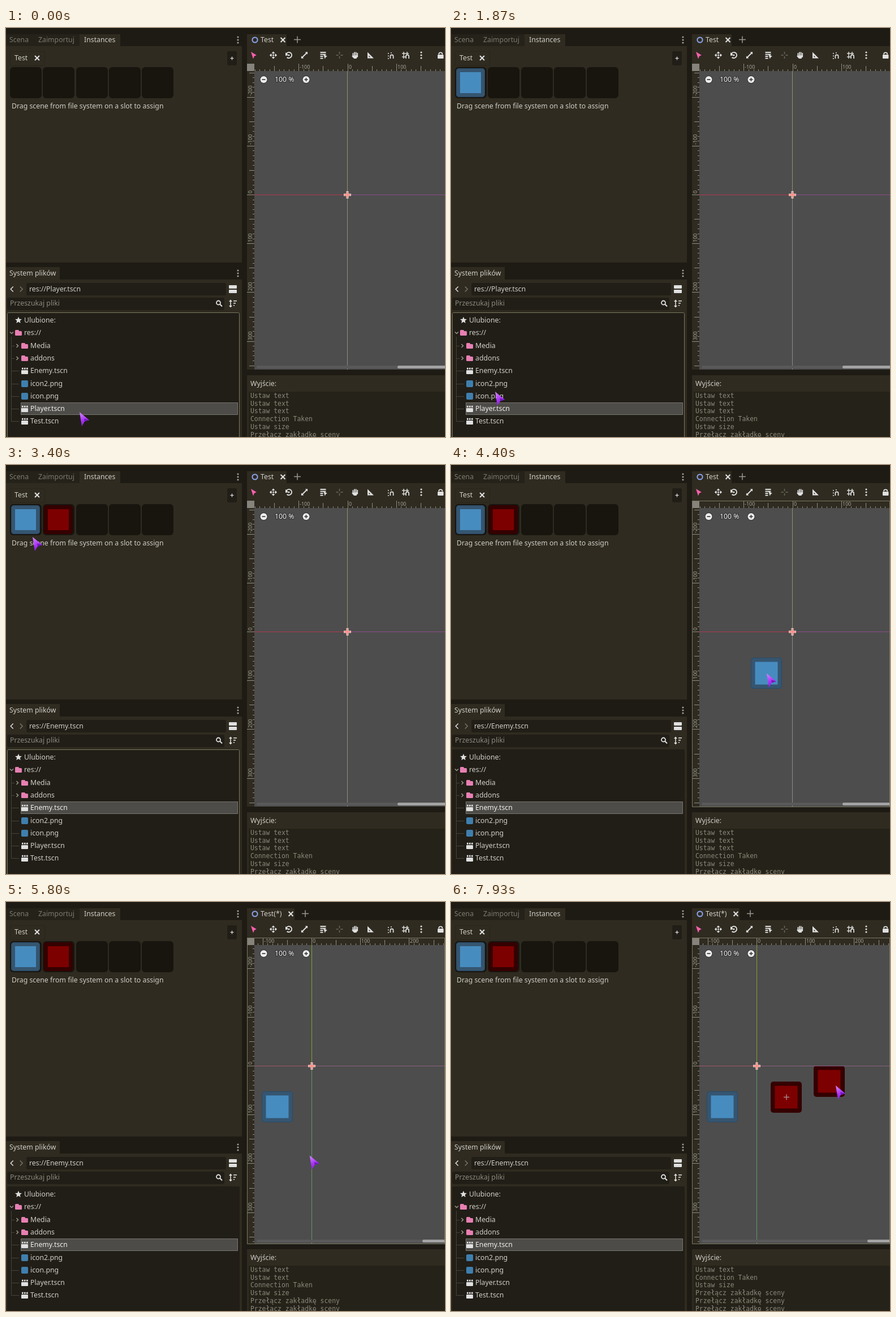
These frames come from a looping animation (776x722 px, 8 s). An HTML page with a canvas:

```html
<!DOCTYPE html>
<html lang="pl">
<head>
<meta charset="utf-8">
<title>Instances</title>
<style>
html, body { margin: 0; width: 100%; height: 100%; overflow: hidden; background: #1e1b15; }
canvas { display: block; }
</style>
</head>
<body>
<canvas id="stage" width="776" height="722"></canvas>
<script>
const g = document.getElementById('stage').getContext('2d');
const W = 776, H = 722, LOOP = 8000, STEP = 200 / 3;
const SANS = '12.3px "Noto Sans", sans-serif';
const MONO = '11.41px "DejaVu Sans Mono", monospace';
const RULER = '9px "Noto Sans", sans-serif';
const C = {
  back: '#1e1b15', panel: '#2f2b20', field: '#211e17', slot: '#18150f',
  text: '#d0cec8', dim: '#7d7a70', icon: '#e0e0e0', focus: '#7b7963',
  pink: '#e77fb3', view: '#4d4d4d', tick: '#8f8d84'
};
const VIEW = { x: 439, y: 76, h: 527 };
const UNIT = 0.862;          // pixels per scene unit
const LAG = 0.35;            // carried sprite trails the pointer, in steps
const ROWS = ['Ulubione:', 'res://', 'Media', 'addons', 'Enemy.tscn', 'icon2.png', 'icon.png', 'Player.tscn', 'Test.tscn'];

// Steps at which the state changes
const AT = { dropPlayer: 17, pickEnemy: 35, dropEnemy: 46, takeBlue: 59, focus: 62, placeBlue: 71,
  pan: 74, takeRed: 97, placeRed: 104, takeNext: 114 };

// Pointer moves: first step, last step, end point
const legs = [];
const home = { x: 130, y: 678 };
const go = (from, to, x, y) => legs.push({ from, to, x, y });
const slot = i => [38 + i * 57, 100];
go(1, 5, 109, 673);
go(7, 16, ...slot(0));
go(AT.dropPlayer, 24, 79, 662);
go(24, 28, 78, 642);
go(30, AT.pickEnemy, 72, 603);
go(36, 44, 84, 119);
go(AT.dropEnemy, 51, 47, 127);
go(51, 55, ...slot(0));
go(AT.takeBlue, 65.6, 558, 368);
go(66, 69.6, 543, 367);
go(70, AT.pan, 657, 388);
go(AT.pan, 77, 624, 389);
go(77, 82, 593.5, 383);
go(85, 89, 480, 512);
go(89, 95, 41, 130);
go(95, AT.takeRed, ...slot(1));
go(AT.takeRed, 99, 528, 314);
go(99, 99.6, 593, 344);
go(103, 106, 643, 320);
go(106, 113, ...slot(1));
go(AT.takeNext, 116, 420, 420);
go(116, 117, 545, 243);
go(117, 119, 680, 324);

const ease = u => u * u * (3 - 2 * u);

function pointer(k) {
  let { x, y } = home;
  for (const leg of legs) {
    if (k <= leg.from) break;
    const u = ease(Math.min(1, (k - leg.from) / (leg.to - leg.from)));
    x += (leg.x - x) * u;
    y += (leg.y - y) * u;
  }
  return { x, y };
}

function origin(k) {
  const o = { x: 603.5, y: 294 };
  if (k < AT.pan) return o;
  const a = pointer(AT.pan), b = pointer(Math.min(k, 84));
  return { x: o.x + b.x - a.x, y: o.y + b.y - a.y };
}

function rect(x, y, w, h, color, r = 0) {
  g.fillStyle = color;
  g.beginPath();
  g.roundRect(x, y, w, h, r);
  g.fill();
}

function frame(x, y, w, h, color, r = 0) {
  g.strokeStyle = color;
  g.lineWidth = 1;
  g.beginPath();
  g.roundRect(x + .5, y + .5, w - 1, h - 1, r);
  g.stroke();
}

function text(s, x, mid, color = C.text, font = SANS) {
  g.font = font;
  g.fillStyle = color;
  g.fillText(s, x, Math.round(mid + 4.4));
}

// Polylines given as flat coordinate lists
function trace(points) {
  g.beginPath();
  for (let i = 0; i < points.length; i += 2) g.lineTo(points[i], points[i + 1]);
}

function line(color, width, ...points) {
  trace(points);
  g.strokeStyle = color;
  g.lineWidth = width;
  g.stroke();
}

function poly(color, ...points) {
  trace(points);
  g.fillStyle = color;
  g.fill();
}

function disc(x, y, r, color) {
  g.fillStyle = color;
  g.beginPath();
  g.arc(x, y, r, 0, Math.PI * 2);
  g.fill();
}

function arc(x, y, r, color, width, from = 0, to = Math.PI * 2) {
  g.strokeStyle = color;
  g.lineWidth = width;
  g.beginPath();
  g.arc(x, y, r, from, to);
  g.stroke();
}

function at(x, y, draw, turn = 0, scale = 1) {
  g.save();
  g.translate(x, y);
  g.rotate(turn);
  g.scale(scale, scale);
  draw();
  g.restore();
}

function clipped(x, y, w, h, draw) {
  g.save();
  g.beginPath();
  g.rect(x, y, w, h);
  g.clip();
  draw();
  g.restore();
}

function plus(x, y, r, color, width) {
  line(color, width, x - r, y, x + r, y);
  line(color, width, x, y - r, x, y + r);
}

const closeMark = (x, y) => at(x, y, () => plus(0, 0, 5.6, C.icon, 2), Math.PI / 4);

function dots(x, y, color) {
  for (const d of [-5, 0, 5]) disc(x, y + d, 1.6, color);
}

function tile(cx, cy, size, red) {
  const x = Math.floor(cx - size / 2), y = Math.floor(cy - size / 2);
  const s = Math.round(size * .72), pad = (size - s) / 2;
  rect(x, y, size, size, red ? '#340000' : '#355570', 5);
  if (!red) frame(x, y, size, size, '#294a66', 5);
  rect(x + pad, y + pad, s, s, red ? '#7d0000' : '#478cbf');
}

function clapper(x, y) {
  rect(x, y - 1, 12, 7, C.icon, 1);
  for (let i = 0; i < 3; i++) at(x + 1 + i * 4, y - 4, () => rect(0, -1, 2.6, 3, C.icon), -.15);
}

function folder(x, y) {
  rect(x, y - 5, 7, 5, C.pink, 1.5);
  rect(x, y - 3, 12, 8, C.pink, 1.5);
}

function chevron(x, y, size, color, turn = 0) {
  at(x, y, () => line(color, 1.5, -size / 2, -size, size / 2, 0, -size / 2, size), turn);
}

function star(x, y) {
  const points = [];
  for (let i = 0; i < 10; i++) {
    const a = i * Math.PI / 5 - Math.PI / 2, r = i % 2 ? 2.8 : 6.3;
    points.push(x + r * Math.cos(a), y + r * Math.sin(a));
  }
  poly(C.icon, ...points);
}

function instances(k) {
  rect(0, 11, 202, 21, '#25221a');
  rect(130, 11, 72, 22, C.panel);
  text('Scena', 6, 21, C.dim);
  text('Zaimportuj', 57, 21, C.dim);
  text('Instances', 138, 21);
  dots(410, 21, '#a09e97');
  rect(0, 32, 417, 382, C.panel);
  frame(7, 41, 62, 26, '#29251b');
  text('Test', 15, 53);
  closeMark(55, 53);
  rect(391, 41, 17, 25, C.field, 3);
  plus(399.5, 53.5, 3, C.icon, 1.2);
  for (let i = 0; i < 5; i++) rect(Math.round(7 + i * 58.3), 69, 56, 55, C.slot, 6);
  if (k >= AT.dropPlayer) tile(34.5, 96.5, 51, false);
  if (k >= AT.dropEnemy) tile(92.8, 96.5, 51, true);
  text('Drag scene from file system on a slot to assign', 10, 138);
}

function fileBar(name) {
  rect(0, 422, 95, 23, C.panel);
  rect(0, 444, 417, 278, C.panel);
  text('System plików', 6, 433);
  dots(410, 433, '#a09e97');
  chevron(10.5, 461, 4.5, C.icon, Math.PI);
  chevron(27, 461, 4.5, '#77746a');
  rect(36, 450, 353, 22, C.field, 3);
  text('res://' + name, 41, 461);
  for (const y of [454, 462]) rect(394, y, 14, 6, C.icon, 1);
  rect(2, 476, 384, 22, C.field, 3);
  text('Przeszukaj pliki', 7, 486, '#8d8a80');
  arc(375.5, 485, 3.5, C.icon, 1.8);
  line(C.icon, 2, 378, 487.5, 382, 491.5);
  line(C.icon, 1.6, 397, 481, 397, 492);
  for (const turn of [0, Math.PI]) at(397, 486.5, () => poly(C.icon, -3, -3.5, 0, -7, 3, -3.5), turn);
  for (let i = 0; i < 3; i++) rect(402, 481 + i * 4, 6 - i * 2, 1.6, C.icon);
}

function tree(k, name) {
  const mid = i => Math.round(516 + i * 22.3);
  const chosen = ROWS.indexOf(name), lines = '#46433a';
  rect(2, 502, 411, 230, C.field, 2);
  if (k < AT.takeBlue + 1) frame(2, 502, 411, 230, C.focus, 2);
  line(lines, 1, 9.5, 545, 9.5, mid(8) + .5);
  rect(26, mid(chosen) - 11, 384, 22, '#4e4c48');
  frame(26, mid(chosen) - 11, 384, 22, '#76746e');
  ROWS.forEach((row, i) => {
    const y = mid(i), depth = i > 1;
    if (depth) line(lines, 1, 9.5, y + .5, i < 4 ? 15 : 23, y + .5);
    if (i === 0) star(22, y);
    else if (i < 4) {
      chevron(depth ? 20 : 10, y, 3, '#9a978d', depth ? 0 : Math.PI / 2);
      folder(depth ? 27 : 16, y);
    } else if (row.endsWith('png')) rect(27, y - 6, 12, 12, '#3f7fae', 2);
    else clapper(27, y);
    text(row, depth ? 43 : 32, y, i === chosen ? '#f0efec' : C.text);
  });
}

function sceneTab(dirty) {
  const w = dirty ? 14 : 0;
  rect(426, 11, 70 + w, 22, C.panel);
  arc(440, 21, 4.6, '#8da5f3', 2);
  text(dirty ? 'Test(*)' : 'Test', 450, 21);
  closeMark(489.5 + w, 21);
  plus(515 + w, 20.5, 6, '#9a988f', 1.5);
}

// Shape shared by the pointer and the select tool
const arrowShape = color => poly(color, 0, 0, 17, 14, 9, 16.5, 4, 25);

// Line with heads at both ends, on the vertical axis
function doubleArrow(r) {
  line(C.icon, 2, 0, -r + 2, 0, r - 2);
  for (const d of [-1, 1]) poly(C.icon, -3, d * (r - 3.2), 0, d * r, 3, d * (r - 3.2));
}

function toolbar() {
  const I = C.icon, quarter = Math.PI / 2;
  rect(426, 32, 350, 31, C.panel);
  at(433, 42, () => arrowShape('#ff5fb0'), -.15, .52);
  for (const turn of [0, quarter]) at(472.5, 48, () => doubleArrow(6.6), turn);
  disc(472.5, 48, 2.6, C.panel);
  disc(472.5, 48, 1.5, I);
  arc(500, 48, 5, I, 2, -2.6, 2.3);
  poly(I, 494, 43, 494, 49, 499.5, 48);
  disc(500, 48, 1.5, I);
  at(527.5, 48, () => doubleArrow(8), Math.PI / 4);
  for (let i = 0; i < 4; i++) rect(555.5, 42 + i * 3.5, i < 2 ? 10 : 5, 2, I);
  at(561, 46, () => arrowShape(I), -.15, .36);
  plus(589.5, 48, 6, '#6b685e', 1.5);
  disc(589.5, 48, 2, C.panel);
  for (let i = 0; i < 4; i++) rect(612.5 + i * 2.6, 44 - 2 * Math.sin(i), 1.8, 8, I, 1);
  poly(I, 611, 49, 622, 48, 619.5, 54, 615, 54);
  poly(I, 639, 42.5, 650, 53.5, 639, 53.5);
  poly(C.panel, 641.5, 48.5, 644.2, 51.2, 641.5, 51.2);
  for (let i = 0; i < 3; i++) rect(675, 44 + i * 4.5, 1.7, 1.7, I);
  rect(680, 43, 1.7, 1.7, I);
  for (const [x, y] of [[682, 50], [709.5, 50]]) {
    arc(x, y, 2.6, I, 1.7, Math.PI, 0);
    for (const d of [-2.6, 2.6]) line(I, 1.7, x + d, y, x + d, y + 4);
  }
  for (const d of [0, 6]) {
    line(I, 1.4, 700, 45 + d, 712 - d, 45 + d);
    line(I, 1.4, 703 + d, 42, 703 + d, 54 - d);
  }
  dots(734, 48, I);
  rect(763, 47, 10.5, 7, I, 1);
  arc(768.2, 46.5, 3.2, I, 1.8, Math.PI, 0);
}

function rulers(o) {
  rect(426, 63, 350, 13, C.panel);
  rect(426, 63, 13, 540, C.panel);
  const size = n => n % 10 === 0 ? 13 : n % 5 === 0 ? 9 : 3;
  clipped(426, 63, 350, 540, () => {
    g.font = RULER;
    for (let n = -40; n <= 45; n++) {
      const x = Math.round(o.x + n * 10 * UNIT), y = Math.round(o.y + n * 10 * UNIT), s = size(n);
      const label = () => {
        g.fillStyle = '#a3a198';
        g.fillText(n * 10, 2, 9);
      };
      if (x > VIEW.x) {
        rect(x, VIEW.y - s, 1, s, C.tick);
        if (n % 10 === 0) at(x, 63, label);
      }
      if (y > VIEW.y) {
        rect(VIEW.x - s, y, s, 1, C.tick);
        if (n % 10 === 0) at(426, y, label, -Math.PI / 2);
      }
    }
  });
  rect(426, 63, 13, 13, '#85837b');
}

function axes({ x, y }, panned) {
  const ax = Math.floor(x), ay = Math.floor(y);
  rect(VIEW.x, ay, ax - VIEW.x, 1, panned ? '#a05565' : '#b0384c');
  rect(ax, ay, W - ax, 1, panned ? '#8a5f80' : '#8d4a8c');
  rect(ax, VIEW.y, 1, ay - VIEW.y, panned ? '#7fa328' : '#93936c');
  rect(ax, ay, 1, 603 - ay, panned ? '#5f9a68' : '#8b8d85');
  plus(ax + .5, ay + .5, 6.5, '#eccfc9', 4);
  plus(ax + .5, ay + .5, 5.5, '#ff857d', 2);
}

function zoomBar() {
  for (const x of [455.5, 530.5]) {
    disc(x, 91, 7, '#333');
    disc(x, 91, 6, '#eee');
    line('#444', 1.8, x - 3, 91, x + 3, 91);
  }
  line('#444', 1.8, 530.5, 88, 530.5, 94);
  g.font = SANS;
  g.strokeStyle = '#333';
  g.lineWidth = 2.5;
  g.lineJoin = 'round';
  g.strokeText('100 %', 475, 95);
  text('100 %', 475, 91, '#f2f2f2');
  g.lineJoin = 'miter';
}

function viewport(k) {
  const o = origin(k), trail = pointer(k - LAG);
  const blue = k >= AT.takeBlue && k < AT.placeBlue;
  const red = k >= AT.takeRed && k < AT.placeRed || k >= AT.takeNext;
  rect(VIEW.x, VIEW.y, W - VIEW.x, VIEW.h, C.view);
  clipped(VIEW.x, VIEW.y, W - VIEW.x, VIEW.h, () => {
    if (k >= AT.placeBlue) tile(o.x - 60.5, o.y + 72.5, 55, false);
    if (k >= AT.placeRed) {
      tile(o.x + 53, o.y + 55.5, 55, true);
      plus(o.x + 53, o.y + 55.5, 5, '#a89090', 1.4);
    }
    if (blue || red) tile(trail.x, trail.y, 55, red);
    axes(o, k >= AT.pan);
    rect(443, 596, 340, 5, '#595959', 2);
    rect(692 + Math.min(603.5 - o.x, 44), 596, 100, 5, '#a3a3a3', 2.5);
  });
  rulers(o);
  if (k >= AT.focus) frame(426, 63, 350, 541, C.focus);
  zoomBar();
}

function output(k) {
  rect(426, 613, 350, 109, C.panel);
  text('Wyjście:', 432, 627.5);
  rect(429, 642, 347, 80, '#252219');
  const log = [...Array(3).fill('Ustaw text'), 'Connection Taken', 'Ustaw size',
    ...Array(3).fill('Przełącz zakładkę sceny')];
  const first = (k >= AT.placeBlue) + (k >= AT.placeRed);
  log.slice(first, first + 6).forEach((s, i) => text(s, 432, 648.6 + i * 13.7, '#8b887c', MONO));
}

function dragged(k, name, { x, y }) {
  const held = k >= 10 && k < AT.dropPlayer || k >= 37 && k < AT.dropEnemy;
  if (!held) return;
  if (y < 528) frame(15, 507, 395, 21, '#8b8974');
  clapper(x + 2, y + 12);
  text(name, x + 20, y + 12);
}

function arrow({ x, y }) {
  at(x, y, () => {
    const shade = g.createLinearGradient(0, 0, 9, 24);
    shade.addColorStop(0, '#d58cff');
    shade.addColorStop(.6, '#a935f7');
    shade.addColorStop(1, '#8420d6');
    arrowShape(shade);
    poly('#7418bd', 17, 14, 9, 16.5, 8, 11.5);
  });
}

function draw(now) {
  const k = Math.min(119, Math.floor((now % LOOP + 7) / STEP));
  const hand = pointer(k), name = k >= AT.pickEnemy ? 'Enemy.tscn' : 'Player.tscn';
  rect(0, 0, W, H, C.back);
  instances(k);
  fileBar(name);
  tree(k, name);
  sceneTab(k >= AT.placeBlue);
  toolbar();
  viewport(k);
  output(k);
  dragged(k, name, hand);
  arrow(hand);
}

const start = performance.now();
function tick() {
  draw(performance.now() - start);
  requestAnimationFrame(tick);
}
tick();
</script>
</body>
</html>
```
